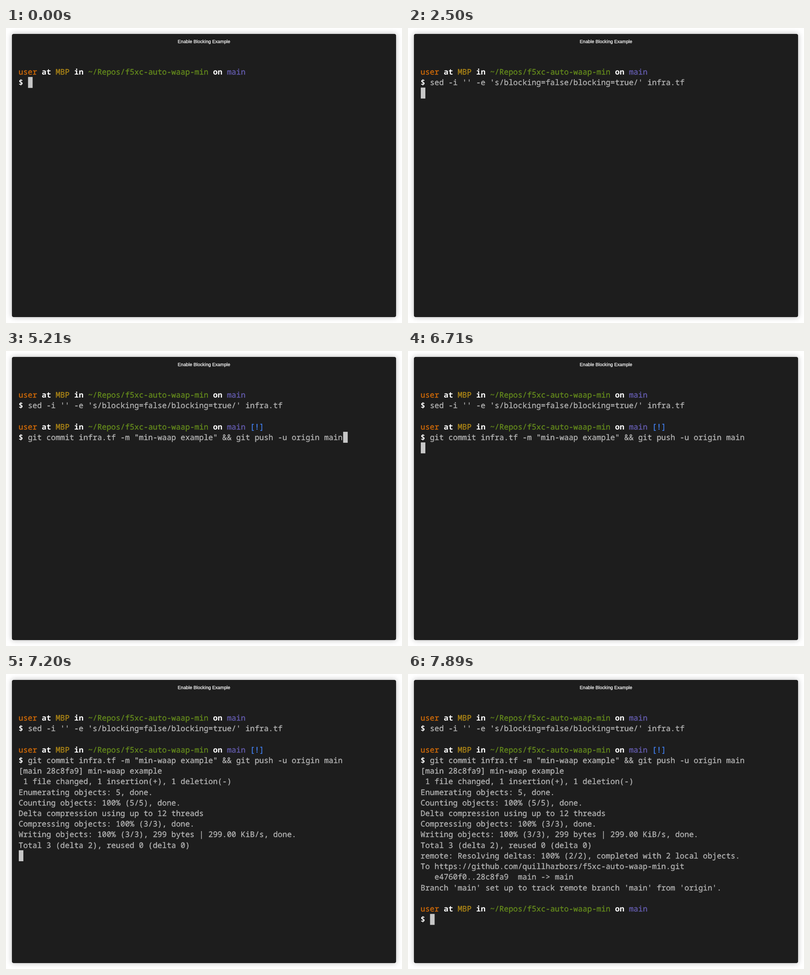
Animation of 867x646 px, one loop 8000 ms. Source, as an HTML page:

```html
<!DOCTYPE html>
<html lang="en">
<head>
<meta charset="utf-8">
<title>Enable Blocking Example</title>
<style>
  html, body { margin: 0; width: 100%; height: 100%; overflow: hidden; background: #fff; }
  #window {
    position: absolute; left: 13px; top: 13px; width: 841px; height: 620px;
    border-radius: 4px; background: #1d1d1d; box-shadow: 0 0 12px rgba(0, 0, 0, .3);
  }
  #title {
    position: absolute; left: 0; top: 25px; width: 867px; text-align: center;
    font: 10.15px/12px "Liberation Sans", Arial, sans-serif; color: #fff;
    -webkit-text-stroke: .25px; text-rendering: geometricPrecision;
  }
  #screen {
    position: absolute; left: 27.6px; top: 83.9px; color: #b4b4b4;
    font: 16.908px/23.23px "Noto Sans Mono", monospace; -webkit-text-stroke: .35px;
    font-variant-ligatures: none; text-rendering: geometricPrecision;
  }
  #screen > * { position: absolute; white-space: pre; }
  #cursor { top: .5px; width: 10.145px; height: 23.23px; background: #c7c7c7; }
  b { color: #fff; font-weight: 600; -webkit-text-stroke: 0; }
  .user { color: #d06a08; }
  .host { color: #af8716; }
  .path { color: #648a1c; }
  .branch { color: #645cae; }
  .flag { color: #4280f2; }
</style>
</head>
<body>
<div id="window"></div>
<div id="title">Enable Blocking Example</div>
<div id="screen"><div id="cursor"></div></div>
<script>
const LOOP = 8000, COL = 10.145, ROW = 23.23;
const screen = document.getElementById('screen');
const cursor = document.getElementById('cursor');
const lines = [];

function print(time, row, html, col = 0) {
  const el = document.createElement('div');
  el.innerHTML = html;
  el.style.left = col * COL + 'px';
  el.style.top = row * ROW + 'px';
  screen.append(el);
  lines.push({ time, el });
}

function prompt(time, row, flag = '') {
  const span = (name, text) => `<span class="${name}">${text}</span>`;
  print(time, row, [
    span('user', 'user'), '<b>at</b>', span('host', 'MBP'), '<b>in</b>',
    span('path', '~/Repos/f5xc-auto-waap-min'), '<b>on</b>',
    span('branch', 'main'), span('flag', flag)
  ].join(' '));
  print(time, row + 1, '<b>$</b>');
}

function output(time, row, rows) {
  rows.forEach((text, i) => print(time, row + i, text));
}

prompt(0, 0);
print(1000, 1, "sed -i '' -e 's/blocking=false/blocking=true/' infra.tf", 2);
prompt(2710, 3, '[!]');
print(5210, 4, 'git commit infra.tf -m "min-waap example" &amp;&amp; git push -u origin main', 2);
output(6740, 5, [
  '[main 28c8fa9] min-waap example',
  ' 1 file changed, 1 insertion(+), 1 deletion(-)'
]);
output(7200, 7, [
  'Enumerating objects: 5, done.',
  'Counting objects: 100% (5/5), done.',
  'Delta compression using up to 12 threads',
  'Compressing objects: 100% (3/3), done.',
  'Writing objects: 100% (3/3), 299 bytes | 299.00 KiB/s, done.',
  'Total 3 (delta 2), reused 0 (delta 0)'
]);
output(7330, 13, ['remote: Resolving deltas: 100% (2/2), completed with 2 local objects.']);
output(7680, 14, [
  'To https://github.com/quillharbors/f5xc-auto-waap-min.git',
  '   e4760f0..28c8fa9  main -> main',
  "Branch 'main' set up to track remote branch 'main' from 'origin'."
]);
prompt(7890, 18);

// Cursor stops: time, row, column
const stops = [
  [0, 1, 2], [1000, 1, 57], [2500, 2, 0], [2710, 4, 2], [5210, 4, 70], [6710, 5, 0],
  [6740, 7, 0], [7200, 13, 0], [7330, 14, 0], [7680, 17, 0], [7890, 19, 2]
];

function draw(now) {
  const t = now % LOOP;
  for (const { time, el } of lines) el.style.visibility = t >= time ? 'visible' : 'hidden';
  const [, row, col] = stops.filter(([time]) => time <= t).pop();
  cursor.style.transform = `translate(${col * COL}px, ${row * ROW}px)`;
}

const start = performance.now();
function tick() {
  draw(performance.now() - start);
  requestAnimationFrame(tick);
}
tick();
</script>
</body>
</html>
```
